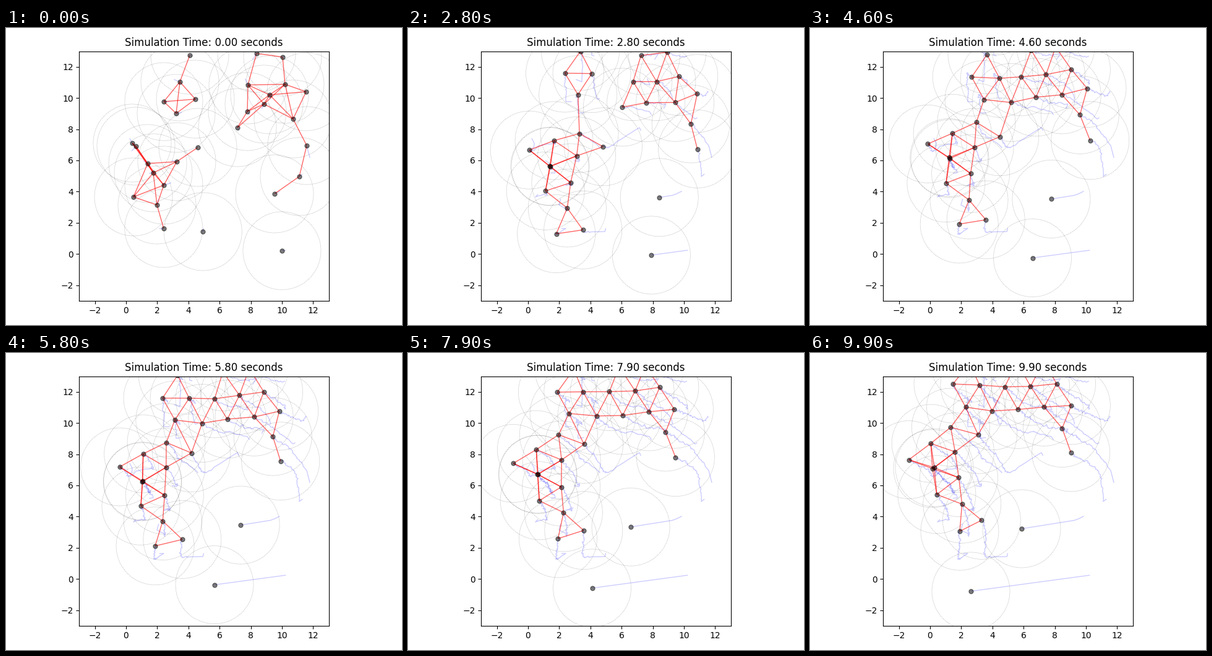
Animation of 640 by 480 pixels, one loop 10 s. Source, as a matplotlib script:

```python
import numpy as np
import matplotlib.pyplot as plt
from matplotlib.animation import FuncAnimation
from matplotlib.collections import LineCollection
from matplotlib.patches import Circle

FRAMES, STEP, LEAD = 100, 0.1, 3     # LEAD: steps already travelled at time zero
RADIUS = 2.5
SCALE, LEFT, BASE = 25.2, 194.0, 365.1   # pixels per unit, pixel position of (0, 0)
KEYS = (0, 1.5, 2.8, 4.6, 7.1, 9.9)
TIMES = (np.arange(FRAMES + LEAD) - LEAD) * STEP
rng = np.random.default_rng(4)


def row(head, step=(0, 0), n=1):
    """Evenly spaced places of a lattice row."""
    return [np.add(head, np.multiply(step, k)) for k in range(n)]


def track(keys, *values):
    """Linear motion through key values, one column per component."""
    return np.column_stack([np.interp(TIMES, keys, v) for v in zip(*values)])


def flock(slots, starts, poses, settle):
    """Agents settle from scattered starts into a lattice that shifts and turns as one."""
    slots = np.array(slots, float)
    centre = slots.mean(axis=0)
    x, y = (slots - centre).T[:, :, None]
    dx, dy, turn = track(KEYS, *poses).T
    c, s = np.cos(turn), np.sin(turn)
    paths = np.stack((c * x - s * y + dx, s * x + c * y + dy), axis=-1) + centre

    scatter = np.array(starts, float) - paths[:, LEAD]
    paths += scatter[:, None] * np.exp(-np.maximum(TIMES, 0) / settle)[:, None]

    paths += rng.normal(0, 18, (len(slots), 1, 2)) * np.minimum(TIMES, 0)[:, None]
    noise = rng.normal(0, 1.6, (len(TIMES) + 2, len(slots), 2))
    wobble = (noise[:-2] + noise[1:-1] + noise[2:]) / 3
    return paths + wobble.swapaxes(0, 1) * np.clip(TIMES, 0, 1)[:, None]


upper = flock(
    row((300, -20)) + row((287, 43)) + row((261, 79), (43, 1), 2) + row((281, 115)),
    [(297, 44), (281, 87), (255, 119), (306, 115), (275, 138)],
    [(-4, 36, 0), (-6, 8, 0), (-8, -6, 0), (0, 0, 0), (-17, -13, 0), (-30, -27, 0)],
    settle=1.2)

left = flock(
    row((269, 153), (-39.5, 17), 3) + row((307, 174), (-41, 18.5), 3) + row((225.4, 211))
    + row((260, 236), (-39, 17), 2) + row((256, 278)) + row((283, 311), (-42, 7), 2),
    [(310, 193), (210, 191), (204, 186), (374, 161), (276, 216), (229, 219),
     (238, 234), (255, 254), (206, 273), (244, 286), (318.3, 329), (254.8, 324)],
    [(12, 14, 0.08), (7, 17, 0.08), (4, 14, 0.06), (0, 0, 0), (-10, -13, -0.13),
     (-23, -30, -0.24)],
    settle=0.7)

right = flock(
    row((356, 38), (42, -6), 2) + row((342, 79), (40.5, -5.5), 3)
    + row((323, 120), (42, -6.7), 4) + row((437, 138), (17, 39), 2),
    [(405, 41), (447, 47), (391, 92), (426, 108), (451, 91), (390, 135), (417, 123),
     (464, 147), (485, 103), (486, 190), (474, 240)],
    [(46, 25, 0.1), (32, 16, 0.1), (20, 10, 0.02), (0, 0, 0), (-13.5, -9.5, 0.05),
     (-27, -20, 0.08)],
    settle=1.8)

loners = [
    track((-0.3, 0, 0.5, 9.9), (442, 264), (434, 268), (427, 270.5), (342, 284)),
    track((-0.3, 9.9), (451.6, 359.2), (260, 385)),
]

paths = (np.concatenate((upper, left, right, loners)) - (LEFT, BASE)) / (SCALE, -SCALE)
first, second = np.triu_indices(len(paths), 1)

fig = plt.figure(figsize=(6.4, 4.8), dpi=100)
ax = fig.add_axes([118.4 / 640, 39.3 / 480, 403.2 / 640, 403.2 / 480])
ax.set(xlim=(-3, 13), ylim=(-3, 13), xticks=range(-2, 13, 2), yticks=range(-2, 13, 2))
title = ax.set_title("")

rings = [ax.add_patch(Circle((0, 0), RADIUS, fill=False, ec="black", lw=0.5, ls=":", alpha=0.45))
         for _ in paths]
trails = [ax.plot([], [], color="blue", lw=1, alpha=0.2, zorder=1.5)[0] for _ in paths]
links = ax.add_collection(LineCollection([], colors="red", linewidths=1, alpha=0.6, zorder=2))
dots = [ax.plot([], [], "o", color="black", ms=5, alpha=0.5, zorder=3)[0] for _ in paths]


def draw(i):
    now = paths[:, i + LEAD]
    for path, pos, ring, trail, dot in zip(paths, now, rings, trails, dots):
        ring.center = pos
        trail.set_data(*path[:i + LEAD + 1].T)
        dot.set_data(pos[:1], pos[1:])
    near = np.hypot(*(now[first] - now[second]).T) < RADIUS
    links.set_segments(np.stack((now[first[near]], now[second[near]]), axis=1))
    title.set_text(f"Simulation Time: {i * STEP:.2f} seconds")
    return [title, links, *rings, *trails, *dots]


anim = FuncAnimation(fig, draw, frames=FRAMES, init_func=lambda: draw(0),
                     interval=100, repeat=True, repeat_delay=0, blit=False)
plt.show()
```
